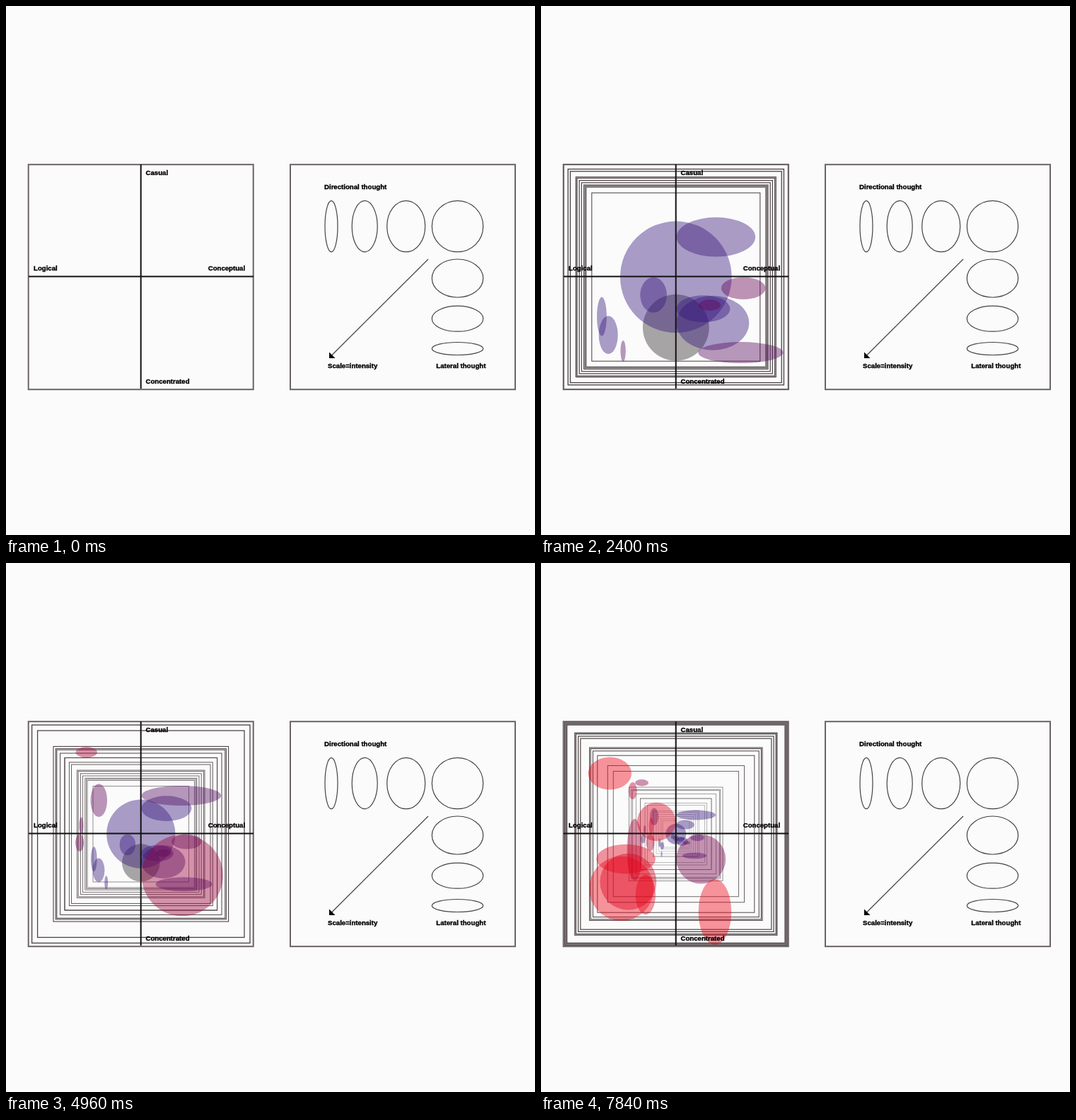
Write an HTML page with a canvas that moves like this. It is 748 px wide and 748 px high and loops after 8000 ms.

```html
<!DOCTYPE html>
<html lang="en">
<head>
<meta charset="utf-8">
<title>Thought map</title>
<style>
  html, body { margin: 0; width: 100%; height: 100%; overflow: hidden; background: #fbfbfb; }
  canvas, svg { position: absolute; left: 0; top: 0; width: 748px; height: 748px; }
  .panel { fill: none; stroke: #6c6365; stroke-width: 2; }
  .axis { stroke: #111; stroke-width: 2; }
  .key { fill: none; stroke: #444; stroke-width: 1.2; }
  text { font: bold 9.65px "Liberation Sans", Arial, sans-serif; stroke: #000; stroke-width: .35; }
</style>
</head>
<body>
<canvas id="stage" width="748" height="748"></canvas>
<svg viewBox="0 0 748 748">
  <rect class="panel" x="31.7" y="224.2" width="318" height="318"/>
  <path class="axis" d="M190.7 224V541M32 382.4H350"/>
  <text x="197.5" y="239">Casual</text>
  <text x="39" y="374">Logical</text>
  <text x="285.7" y="374">Conceptual</text>
  <text x="197.5" y="534">Concentrated</text>

  <rect class="panel" x="402" y="224.2" width="318" height="318"/>
  <g class="key">
    <ellipse cx="460" cy="311.5" rx="9" ry="36.2"/>
    <ellipse cx="507.2" cy="311.5" rx="18" ry="36.2"/>
    <ellipse cx="565.7" cy="311.5" rx="27" ry="36.2"/>
    <circle cx="638.5" cy="311.5" r="36.2"/>
    <ellipse cx="638.5" cy="385" rx="36.2" ry="27"/>
    <ellipse cx="638.5" cy="442.2" rx="36.2" ry="18"/>
    <ellipse cx="638.5" cy="484.5" rx="36.2" ry="9"/>
    <path d="M597 358L460 494.5"/>
  </g>
  <path d="M457 489.5V498H465.5Z"/>
  <text x="450" y="258.5">Directional thought</text>
  <text x="455" y="512">Scale=intensity</text>
  <text x="608.3" y="512">Lateral thought</text>
</svg>
<script>
const ctx = document.getElementById("stage").getContext("2d");
const LOOP = 8000, STEP = 80, LAST = 7840, LIFE = 7950;
const CENTER_X = 190.8, CENTER_Y = 383.2, HALF = 159;
const CELL = HALF / 10, INTENSITY = CELL * .985;

// Thoughts sit on a grid of cells around the centre, in whole steps of
// intensity and in the quarter steps of roundness that the key shows.
const thoughts = [];
function circle(birth, x, y, level) {
  thoughts.push({ birth, x, y, rx: level, ry: level });
}
function tall(birth, x, y, level, roundness = 1 / 2) {
  thoughts.push({ birth, x, y, rx: level * roundness, ry: level });
}
function wide(birth, x, y, level, roundness = 1 / 2) {
  thoughts.push({ birth, x, y, rx: level, ry: level * roundness });
}
// A wide thought that touches the vertical axis from the right.
function wideOnAxis(birth, y, level, roundness) {
  wide(birth, level, y, level, roundness);
}
// Two small thoughts, just above and just below the horizontal axis.
function pair(birth, x) {
  tall(birth, x, -1, 1, 1 / 4);
  tall(birth + 2 * STEP, x, 1, 1);
}

circle(400, 0, 6, 4);
tall(800, -2.5, 2, 2, 3 / 4);
wideOnAxis(880, 3.5, 3);
wideOnAxis(960, 5, 4, 3 / 4);
circle(1120, 0, 0, 6);
tall(1280, -7, 6, 2);
tall(1440, -7.5, 4, 2, 1 / 4);
wideOnAxis(1520, -4, 4);
tall(1920, -5, 7, 1, 1 / 4);
wide(2080, 6, 7, 4, 1 / 4);
for (const level of [1, 2]) wide(2400, 3 * level, 4 - 1.5 * level, level);
wideOnAxis(2720, -4.75, 5, 1 / 4);
tall(2960, -5, -4, 2);
pair(3040, -7);
circle(4320, 4, 4, 4);
wide(4720, -5, -7.5, 1);
tall(5440, -5.25, 2, 4, 1 / 4);
pair(5760, -3);
tall(6000, -5, -5, 1);
for (const birth of [6640, 7600]) circle(birth, -5, 5, 3);
circle(6800, -2, -1.25, 2);
wide(6960, -5, 2.5, 3);
tall(7040, -3, 6, 2);
wide(7680, -6, -5.5, 2, 3 / 4);
tall(7760, 3.5, 7, 3);
thoughts.sort((a, b) => a.birth - b.birth);

// The opening thought is grey; later ones run from indigo to red and cool with age.
function tint(birth, age) {
  if (birth < 800) return "rgba(85, 78, 80, .5)";
  const warmth = Math.min(1, Math.max(0, (birth - .4 * age - 1120) / 6100));
  const red = 53 + 184 * warmth ** .85;
  const green = 23 * (1 - Math.min(1, warmth * 4));
  const blue = 125 - 105 * warmth ** .6;
  return `rgba(${red}, ${green}, ${blue}, .42)`;
}

// Each thought recedes to the centre together with its own square frame.
function drawThought({ birth, x, y, rx, ry }, time) {
  const age = time - birth;
  const scale = 1 - age / LIFE;
  const cell = CELL * scale, radius = INTENSITY * scale, half = HALF * scale;
  ctx.fillStyle = tint(birth, age);
  ctx.beginPath();
  ctx.ellipse(CENTER_X + x * cell, CENTER_Y + y * cell, rx * radius, ry * radius, 0, 0, 7);
  ctx.fill();
  ctx.lineWidth = 1.4 * scale;
  ctx.strokeRect(CENTER_X - half, CENTER_Y - half, 2 * half, 2 * half);
}

function draw(time) {
  ctx.clearRect(0, 0, 748, 748);
  ctx.strokeStyle = "#4d4446";
  for (const thought of thoughts) {
    if (thought.birth <= time) drawThought(thought, time);
  }
}

const start = performance.now();
function tick() {
  const time = (performance.now() - start) % LOOP;
  draw(Math.min(LAST, Math.floor(time / STEP) * STEP));
  requestAnimationFrame(tick);
}
tick();
</script>
</body>
</html>
```
